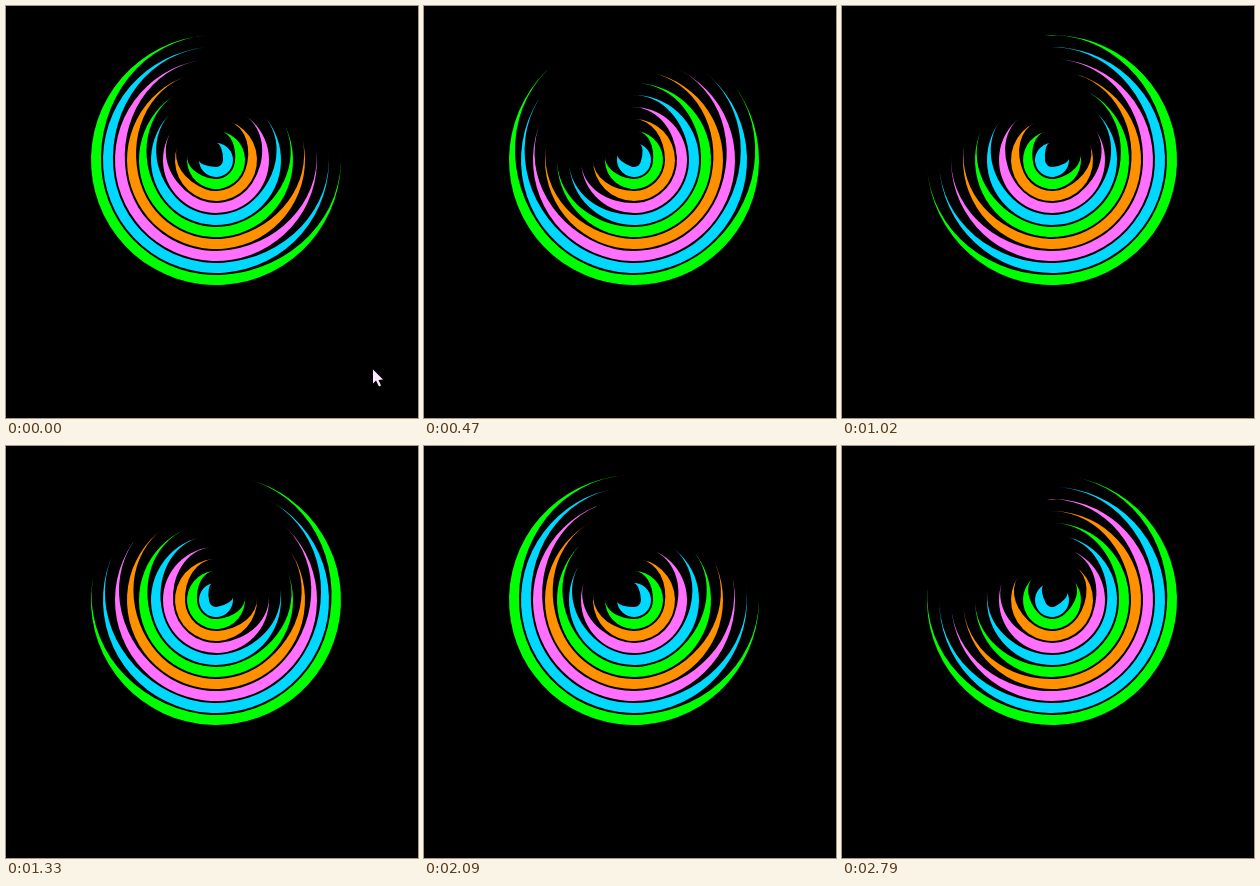
Write an HTML page with a canvas that moves like this. It is 412 by 412 pixels and loops after 2860 ms.

```html
<!DOCTYPE html>
<html lang="en">
<head>
<meta charset="utf-8">
<title>Swinging rings</title>
<style>
html, body { margin: 0; width: 100%; height: 100%; overflow: hidden; background: #000; }
canvas { display: block; width: 412px; height: 412px; }
</style>
</head>
<body>
<canvas id="stage" width="412" height="412"></canvas>
<script>
const ctx = document.getElementById('stage').getContext('2d');
const LOOP = 2860;
const SWING = 2000;   // there and back
const LAG = 100;      // each ring leads the one around it
const RINGS = 10;
const BAND = 10;
const COLORS = ['#00ff00', '#00d8ff', '#ff70ff', '#ff9000'];
const RAD = Math.PI / 180;

// Runs of evenly spaced steps: first, last, count
const RUNS = [
  [0, 0, 1], [70, 470, 7], [570, 570, 1], [640, 1100, 7],
  [1170, 1640, 7], [1710, 2170, 7], [2250, 2710, 7], [2790, 2790, 1]
];
const steps = RUNS.flatMap(([first, last, n]) =>
  Array.from({ length: n }, (_, i) =>
    Math.round((first + (last - first) * i / Math.max(1, n - 1)) / 10) * 10));

function stepTime(t) {
  let held = 0;
  for (const s of steps) if (s <= t) held = s;
  return held;
}

// Direction of the gap, in degrees clockwise from the top
function gapAngle(i, t) {
  const crossing = 540 - LAG * i;
  return -3.5 - 45 * Math.sin((t - crossing) / SWING * 2 * Math.PI);
}

// Full band at left and bottom, tapering to nothing at top and right
function drawRing(i, t) {
  const r = 125 - 12 * i;
  const inner = r - BAND;
  const q = Math.PI / 2;
  ctx.save();
  ctx.translate(210, 154);
  ctx.rotate((gapAngle(i, t) - 45) * RAD);
  ctx.beginPath();
  ctx.arc(0, 0, r, -q, 0, true);
  ctx.ellipse(0, 0, r, inner, 0, 0, q);
  ctx.ellipse(0, 0, inner, inner, 0, q, 2 * q);
  ctx.ellipse(0, 0, inner, r, 0, 2 * q, 3 * q);
  ctx.closePath();
  ctx.fillStyle = COLORS[i % COLORS.length];
  ctx.fill();
  ctx.restore();
}

function drawPointer() {
  const shape = [[0, 0], [0, 14], [3, 11], [6, 17], [8, 16], [5.5, 10.5], [10, 10]];
  ctx.beginPath();
  for (const [x, y] of shape) ctx.lineTo(367 + x, 363.5 + y);
  ctx.closePath();
  ctx.fillStyle = '#ffe6ff';
  ctx.fill();
}

function draw(t) {
  ctx.fillStyle = '#000';
  ctx.fillRect(0, 0, 412, 412);
  for (let i = 0; i < RINGS; i++) drawRing(i, t);
  if (t < 70) drawPointer();
}

const start = performance.now();
function frame() {
  draw(stepTime((performance.now() - start) % LOOP));
  requestAnimationFrame(frame);
}
frame();
</script>
</body>
</html>
```
